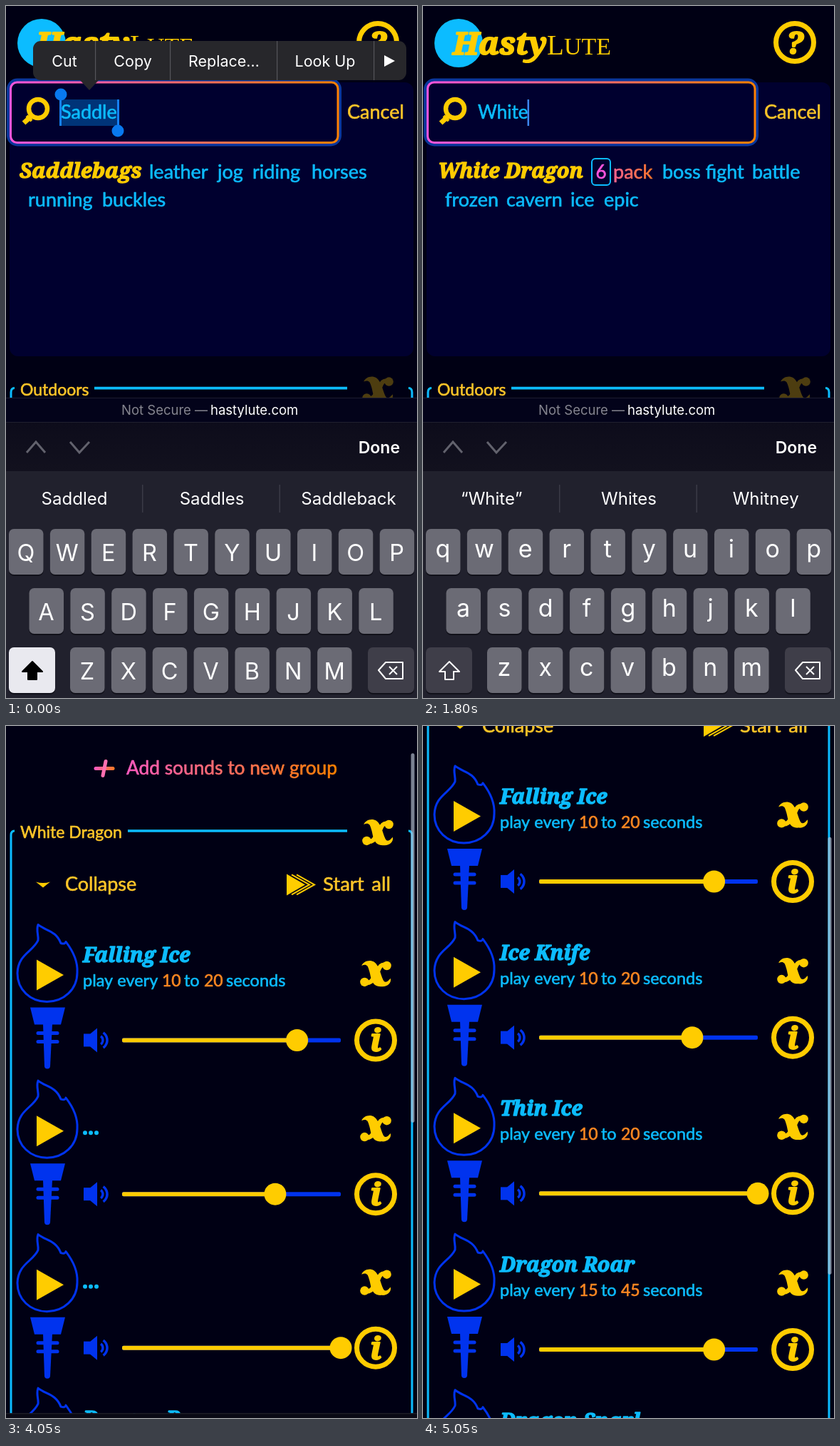
An HTML page with a canvas for the animation above (5.1 s loop, 577 by 970 pixels).

```html
<!DOCTYPE html>
<html lang="en">
<head>
<meta charset="utf-8">
<title>Sound search</title>
<style>
html, body { margin: 0; width: 100%; height: 100%; overflow: hidden; background: #000014; }
canvas { display: block; }
</style>
</head>
<body>
<canvas id="stage" width="577" height="970"></canvas>
<script>
const ctx = document.getElementById('stage').getContext('2d');
const W = 577, H = 970, LOOP = 5100, STEP = 50;
const BG = '#000014', PANEL = '#00002f', CYAN = '#0cbcff', GOLD = '#ffcc00',
      AMBER = '#ffc629', BLUE = '#0033ee', ORANGE = '#ff8822', PINK = '#ff55dd';
const BODY = 'Lato, sans-serif', UI = 'Inter, sans-serif', SERIF = '"Noto Serif", serif',
      CAPS = '"Liberation Serif", serif';

const TYPED = [[250, 'W'], [500, 'Wh'], [750, 'Whi'], [1000, 'Whit'], [1350, 'White']];
const OPEN = 2400, SLIDE = 2485, SLIDE_TIME = 350, DRAG = 4030, FLICK = 4450;
const SOUNDS = [
  { name: 'Falling Ice', from: 10, to: 20, volume: 0.8, ready: 2800 },
  { name: 'Ice Knife', from: 10, to: 20, volume: 0.7, ready: 4600 },
  { name: 'Thin Ice', from: 10, to: 20, volume: 1, ready: 4750 },
  { name: 'Dragon Roar', from: 15, to: 45, volume: 0.8, ready: 3800 },
  { name: 'Dragon Snarl', from: 15, to: 45, volume: 0.8, ready: 4800 }
];

const clamp = v => Math.max(0, Math.min(1, v));
const smooth = p => p * p * (3 - 2 * p);

function text(s, x, y, size, color, font = BODY, align = 'left', style = '') {
  ctx.font = `${style} ${size}px ${font}`;
  ctx.textAlign = align;
  ctx.fillStyle = color;
  ctx.fillText(s, x, y);
}

function outline(s, x, y, color, width) {
  ctx.strokeStyle = color;
  ctx.lineWidth = width;
  ctx.lineJoin = 'round';
  ctx.strokeText(s, x, y);
}

// Body copy, a touch heavier than the regular weight.
function copy(s, x, y, size, color, align = 'left') {
  text(s, x, y, size, color, BODY, align);
  outline(s, x, y, color, 0.6);
}

function display(s, x, y, size, color, align = 'left') {
  text(s, x, y, size, color, SERIF, align, 'italic 900');
  outline(s, x, y, color, size / 20);
}

function rect(x, y, w, h, color) {
  ctx.fillStyle = color;
  ctx.fillRect(x, y, w, h);
}

function round(x, y, w, h, r, fill, edge, width) {
  ctx.beginPath();
  ctx.roundRect(x, y, w, h, r);
  if (fill) { ctx.fillStyle = fill; ctx.fill(); }
  if (edge) { ctx.strokeStyle = edge; ctx.lineWidth = width; ctx.stroke(); }
}

function disc(x, y, r, color) {
  ctx.beginPath();
  ctx.arc(x, y, r, 0, 7);
  ctx.fillStyle = color;
  ctx.fill();
}

function poly(points, color) {
  ctx.beginPath();
  points.forEach(([x, y]) => ctx.lineTo(x, y));
  ctx.closePath();
  ctx.fillStyle = color;
  ctx.fill();
}

function line(points, color, width, cap = 'butt') {
  ctx.beginPath();
  points.forEach(([x, y]) => ctx.lineTo(x, y));
  stroke(color, width, cap);
}

function stroke(color, width, cap = 'round') {
  ctx.strokeStyle = color;
  ctx.lineWidth = width;
  ctx.lineCap = cap;
  ctx.lineJoin = cap === 'round' ? 'round' : 'miter';
  ctx.stroke();
}

function blend(x0, x1) {
  const g = ctx.createLinearGradient(x0, 0, x1, 0);
  g.addColorStop(0, PINK);
  g.addColorStop(1, '#ff8000');
  return g;
}

function at(x, y, draw) {
  ctx.save();
  ctx.translate(x, y);
  draw();
  ctx.restore();
}

function cross(x, y, color) {
  at(x, y, () => {
    ctx.scale(1.04, 1.04);
    ctx.beginPath();
    ctx.moveTo(14, -12);
    ctx.bezierCurveTo(3, -14, 5, -3, 0, 1);
    ctx.bezierCurveTo(-4, 6, -4, 13, -15, 12);
    stroke(color, 6);
    ctx.beginPath();
    ctx.moveTo(-19, -11);
    ctx.bezierCurveTo(-17, -17, -8, -20, -2, -16);
    ctx.bezierCurveTo(5, -11, 7, 2, 10, 8);
    ctx.bezierCurveTo(12, 13, 16, 11, 20, 6);
    ctx.bezierCurveTo(22, 12, 15, 18, 8, 17);
    ctx.bezierCurveTo(-7, 18, -6, 3, -9, -5);
    ctx.bezierCurveTo(-11, -13, -14, -13, -19, -11);
    ctx.fillStyle = color;
    ctx.fill();
    disc(15, -11, 6, color);
    disc(-15, 11, 6, color);
  });
}

function badge(x, y, mark) {
  ctx.beginPath();
  ctx.arc(x, y, 26.5, 0, 7);
  stroke(GOLD, 7);
  display(mark, x, y + 16, 44, GOLD, 'center');
}

function header(scroll) {
  at(0, -scroll, () => {
    disc(50, 52, 34, CYAN);
    display('Hasty', 42, 68, 44, GOLD);
    text('L', 174, 68, 39, GOLD, CAPS);
    text('UTE', 198, 68, 34, GOLD, CAPS);
    badge(522, 51, '?');
  });
}

function groupSide(x, inner, y) {
  ctx.beginPath();
  ctx.moveTo(inner, y);
  ctx.quadraticCurveTo(x, y, x, y + 6);
  ctx.lineTo(x, y + 2000);
  stroke(CYAN, 3, 'butt');
}

function groupTop(title, y, xColor) {
  copy(title, 20, y + 8, 23, AMBER);
  const edge = y - 2.4;
  line([[title === 'Outdoors' ? 124 : 171, edge], [479, edge]], CYAN, 3.6);
  groupSide(7, 12, edge);
  groupSide(570, 565, edge);
  cross(522, y, xColor);
}

function results(words, y) {
  words.forEach(([s, x]) => copy(s, x, y, 27, CYAN));
}

function searchPage(typed) {
  header(0);
  round(5, 107, 567, 384, 12, PANEL);
  round(4, 104.5, 464, 89, 12, PANEL, '#0a379c', 6);
  round(6.5, 107, 459.5, 84.5, 9, PANEL, blend(7, 466), 3);
  ctx.beginPath();
  ctx.arc(45, 144, 13, 0, 7);
  stroke(GOLD, 6.5);
  line([[36, 154], [25, 164]], GOLD, 7);
  line([[29, 154], [36, 161]], GOLD, 4);
  copy('Cancel', 479, 158, 27, AMBER);

  if (typed) {
    copy(typed, 77, 158, 26, CYAN);
    rect(76 + ctx.measureText(typed).width, 131, 2.5, 37, '#3d86ee');
    display('White Dragon', 21, 241, 28.6, GOLD);
    round(237, 214, 26, 37, 5, null, CYAN, 2);
    copy('6', 250, 242, 26, PINK, 'center');
    copy('pack', 267, 242, 27, blend(225, 345));
    results([['boss fight', 336], ['battle', 462]], 242);
    results([['frozen', 31], ['cavern', 117], ['ice', 207], ['epic', 254]], 281);
  } else {
    rect(76, 131, 82, 37, '#003478');
    copy('Saddle', 77, 158, 27, CYAN);
    rect(75, 131, 3, 37, '#1680f5');
    rect(156, 131, 3, 37, '#1680f5');
    disc(77, 124, 8.5, '#0879ef');
    disc(157, 175, 8.5, '#0879ef');
    display('Saddlebags', 19, 241, 29.3, GOLD);
    results([['leather', 201], ['jog', 297], ['riding', 346], ['horses', 429]], 242);
    results([['running', 31], ['buckles', 135]], 281);
  }
  groupTop('Outdoors', 538, '#4d3d10');
  if (!typed) menu();
}

function menu() {
  const fill = '#27272b';
  round(38, 49, 524, 55, 11, fill);
  poly([[103, 103], [131, 103], [117, 118]], fill);
  [125, 230, 380, 516].forEach(x => rect(x, 49, 1.2, 55, '#55555a'));
  [['Cut', 82], ['Copy', 178], ['Replace…', 306], ['Look Up', 448]]
    .forEach(([s, x]) => text(s, x, 85, 21.5, '#fff', UI, 'center'));
  poly([[531, 69], [531, 85], [546, 77]], '#fff');
}

function flame() {
  ctx.beginPath();
  ctx.moveTo(45, 1);
  ctx.bezierCurveTo(56, 10, 70, 9, 77, 27);
  ctx.quadraticCurveTo(83, 29, 84, 25);
  ctx.bezierCurveTo(94, 38, 101, 52, 100, 68);
  ctx.bezierCurveTo(100, 92, 81, 109, 57.5, 109);
  ctx.bezierCurveTo(34, 109, 16, 92, 16, 69);
  ctx.bezierCurveTo(17, 42, 38, 39, 45, 23);
  ctx.bezierCurveTo(46, 16, 42, 9, 45, 1);
  ctx.closePath();
  stroke(BLUE, 3);
}

function torch() {
  poly([[34, 117], [83, 117], [77, 141], [40, 141]], BLUE);
  poly([[52, 140], [65, 140], [62, 200], [54, 200]], BLUE);
  disc(58, 199, 4, BLUE);
  line([[45, 153], [72, 153]], BLUE, 5, 'round');
  line([[45, 165], [72, 165]], BLUE, 5, 'round');
}

function slider(y, volume) {
  rect(109, y - 9, 9, 18, BLUE);
  poly([[117, y - 8], [128, y - 17], [128, y + 17], [117, y + 8]], BLUE);
  [7, 13].forEach(r => {
    ctx.beginPath();
    ctx.arc(129, y, r, -0.95, 0.95);
    stroke(BLUE, 3.5, 'butt');
  });
  const knob = 163 + 307 * volume;
  round(163, y - 3, 307, 6, 2, BLUE);
  round(163, y - 3, knob - 163, 6, 2, GOLD);
  disc(knob, y, 15.5, GOLD);
  badge(519, y, 'i');
}

function sound(s, ready) {
  flame();
  poly([[43, 50], [43, 93], [81, 71.5]], GOLD);
  torch();
  if (ready) {
    display(s.name, 108, 54, 28.5, CYAN);
    [['play every', 108], ['to', 250], ['seconds', 309]]
      .forEach(([w, x]) => copy(w, x, 88, 23.5, CYAN));
    copy(s.from, 219, 88, 23, ORANGE);
    copy(s.to, 278, 88, 23, ORANGE);
  } else {
    [111, 119, 127].forEach(x => disc(x, 74, 3, CYAN));
  }
  cross(519, ready ? 70 : 68.5, GOLD);
  slider(ready ? 163 : 160, s.volume);
}

function groupPage(t, scroll) {
  header(scroll);
  at(0, -scroll, () => {
    line([[126, 150], [150, 150]], blend(120, 158), 5, 'round');
    line([[140, 140], [136, 160]], '#ff6fb0', 5, 'round');
    copy('Add sounds to new group', 169, 159, 26.3, blend(124, 463));
    groupTop('White Dragon', 240, GOLD);
    ctx.beginPath();
    ctx.moveTo(42, 309);
    ctx.quadraticCurveTo(52, 312, 62, 309);
    ctx.lineTo(52, 317);
    ctx.fillStyle = GOLD;
    ctx.fill();
    copy('Collapse', 83, 322, 27, AMBER);
    poly([[394, 298], [394, 328], [420, 313]], GOLD);
    [0, 7].forEach(d => line([[401 + d, 299], [426 + d, 313], [401 + d, 327]], GOLD, 2));
    copy('Start', 445, 322, 27.5, AMBER);
    copy('all', 540, 322, 27.5, AMBER, 'right');
    let y = 368;
    SOUNDS.forEach(s => {
      const ready = t >= s.ready;
      at(0, y, () => sound(s, ready));
      y += ready ? 218.7 : 215.5;
    });
  });
}

function addressBar(drop) {
  const grow = clamp(drop / 37), h = 34 + 12 * grow, top = 583 + drop - h;
  rect(0, top, W, H - top, '#03031a');
  rect(0, top, W, 1, '#1c1c30');
  const base = top + 24 + 2 * grow;
  ctx.save();
  ctx.beginPath();
  ctx.rect(0, top, 283, drop > 0 ? 31 : h);
  ctx.clip();
  ctx.globalAlpha = 1 - clamp(drop / 400);
  text('Not Secure —', 162 - 2 * grow, base + 5 * grow, 18.5 + 4 * grow, '#85858f', UI);
  ctx.restore();
  text('hastylute.com', 287, base, 18.5, '#fff', UI);
  if (drop > 0) {
    text('AA', 44, top + 26, 16, '#1a1a30', UI);
    ctx.beginPath();
    ctx.arc(527, top + 20, 8, 0, 5);
    stroke('#16162a', 2);
  }
}

function suggestions(t, typed) {
  if (t >= 2500) return [['and', 'is', 'shirt'], t - 2500];
  if (!typed) return [['Saddled', 'Saddles', 'Saddleback'], 999];
  const since = t - TYPED.filter(e => e[0] <= t).pop()[0];
  return [[`“${typed}”`, typed === 'White' ? 'Whites' : 'White', 'Whitney'], since];
}

function suggestion(s, x, age) {
  ctx.font = `24px ${UI}`;
  const left = x - ctx.measureText(s).width / 2, head = s.slice(0, -1);
  text(head, left, 699, 24, '#fff', UI);
  const w = ctx.measureText(head).width;
  text(s.slice(-1), left + w, 699, 24, age < 100 ? '#858590' : '#fff', UI);
}

function key(x, y, w, fill) {
  round(x, y + 2, w, 64, 7, '#11111a');
  round(x, y, w, 64, 7, fill);
}

function keyboard(t, typed, drop) {
  at(0, drop, () => {
    const g = ctx.createLinearGradient(0, 583, 0, 651);
    g.addColorStop(0, '#0d0c1b');
    g.addColorStop(1, '#12111e');
    rect(0, 583, W, 69, g);
    rect(0, 583, W, 1, '#20202f');
    rect(0, 652, W, 400, '#21212d');
    line([[29, 626], [42, 611], [55, 626]], '#62626d', 3);
    line([[90, 611], [103, 626], [117, 611]], '#62626d', 3);
    text('Done', 553, 627, 23, '#fff', UI, 'right', '600');
    const [words, age] = suggestions(t, typed);
    words.forEach((s, i) => suggestion(s, [96, 289, 481][i], age));
    rect(191, 671, 1.5, 39, '#3b3b47');
    rect(383.5, 671, 1.5, 39, '#3b3b47');

    [['qwertyuiop', 4, 733], ['asdfghjkl', 32.5, 816], ['zxcvbnm', 90, 899]].forEach(([row, x0, y]) => {
      [...row].forEach((c, i) => {
        const x = x0 + 57.85 * i;
        key(x, y, 48.5, '#6b6b75');
        if (typed) text(c, x + 24, y + 40, 34, '#fff', UI, 'center');
        else text(c.toUpperCase(), x + 24, y + 45, 32.5, '#fff', UI, 'center');
      });
    });
    key(4, 899, 65, typed ? '#3f3e49' : '#e9e9ef');
    ctx.beginPath();
    [[37, 919], [51, 933], [43, 933], [43, 944], [31, 944], [31, 933], [23, 933]]
      .forEach(([x, y]) => ctx.lineTo(x, y));
    ctx.closePath();
    if (!typed) { ctx.fillStyle = '#000'; ctx.fill(); }
    stroke(typed ? '#fff' : '#000', 2);
    key(508, 899, 65, '#3f3e49');
    ctx.beginPath();
    [[523, 931], [533, 920], [557, 920], [557, 943], [533, 943]].forEach(([x, y]) => ctx.lineTo(x, y));
    ctx.closePath();
    stroke('#fff', 2);
    line([[538, 926], [549, 937]], '#fff', 2);
    line([[549, 926], [538, 937]], '#fff', 2);
  });
}

// Finger drag up to FLICK, then decaying momentum.
function travel(t) {
  if (t < DRAG) return 0;
  if (t < FLICK) {
    const p = (t - DRAG) / (FLICK - DRAG);
    return p * p * (247.2 - 117.2 * p);
  }
  return 130 + 110.5 * (1 - Math.exp((FLICK - t) / 325));
}

function scrollBar(t, moved) {
  const shown = clamp((t - 3950) / 100);
  if (!shown) return;
  const top = 38 + moved * 0.553 - Math.max(0, moved - 130) * 0.06;
  const len = 517 + 96 * clamp(moved / 130);
  ctx.globalAlpha = shown;
  round(568.5, top, 5, len, 2.5, 'rgba(190,200,215,0.65)');
  ctx.globalAlpha = 1;
}

function draw(t) {
  ctx.globalAlpha = 1;
  rect(0, 0, W, H, BG);
  const last = TYPED.filter(e => e[0] <= t).pop();
  const typed = last ? last[1] : '';
  const p = smooth(clamp((t - SLIDE) / SLIDE_TIME));
  const drop = 426 * p, moved = travel(t);
  if (t < OPEN) searchPage(typed);
  else groupPage(t, 90 * Math.pow(p, 1.1) + moved);
  if (p < 1) {
    addressBar(drop);
    keyboard(t, typed, drop);
  } else {
    const top = 963 + moved / 2;
    rect(0, top, W, 10, '#090914');
    rect(0, top, W, 1, '#25252e');
    scrollBar(t, moved);
  }
}

const start = performance.now();
function tick() {
  const t = (performance.now() - start) % LOOP;
  draw(Math.floor(t / STEP) * STEP);
  requestAnimationFrame(tick);
}
tick();
</script>
</body>
</html>
```
